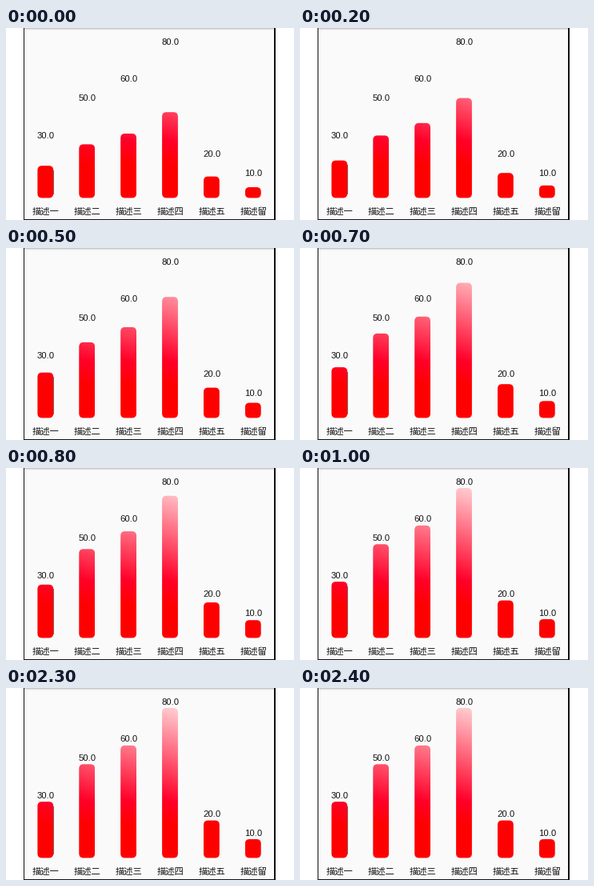
A matplotlib script that plays this animation: 360 px wide and 240 px high, repeating every 2500 ms.

```python
import numpy as np
import matplotlib.pyplot as plt
from matplotlib.animation import FuncAnimation
from matplotlib.patches import FancyBboxPatch, Rectangle

W, H, DPI = 360, 240, 100
FRAMES, INTERVAL = 25, 100
BASE, UNIT, BAR_W, RADIUS = 212.4, 2.343, 19.8, 5.5
FIRST_X, PITCH = 39.4, 51.9
START, STEP = 0.572, 0.047
TEXT_PX = 11.3

values = [30, 50, 60, 80, 20, 10]
labels = ["描述一", "描述二", "描述三", "描述四", "描述五", "描述留"]

fig = plt.figure(figsize=(W / 100, H / 100), dpi=DPI, facecolor="white")
ax = fig.add_axes([0, 0, 1, 1])
ax.axis("off")


def rect(x, y, w, h, color, z=0):
    ax.add_patch(Rectangle((x, y), w, h, fc=color, lw=0, zorder=z,
                           antialiased=False))


def text(x, y, s, font):
    ax.text(x, y, s, family=font, size=TEXT_PX * 72 / DPI, color="#111111",
            ha="center", va="baseline", zorder=4)


def gradient():
    """Pale pink to crimson to red, slightly tilted across the bar."""
    y, x = np.mgrid[0:H * 2, 0:40] / 2.0
    d = y - 0.3 * (x - 10)
    stops = [25, 141, 172]
    channels = [np.interp(d, stops, c)
                for c in ([255, 255, 255], [202, 0, 0], [206, 40, 0])]
    return np.stack(channels, axis=-1) / 255


def draw_frame():
    rect(22, 0, 315, 240, "#fafafa")
    for y, shade in enumerate(["#c4c4c4", "#e2e2e2", "#f2f2f2"]):
        rect(23, y, 313, 1, shade)
    rect(22, 0, 1, 240, "#111111", 1)
    rect(335, 0, 2, 240, "#111111", 1)
    rect(22, 239, 315, 1, "#111111", 1)


draw_frame()
shades = gradient()
bars = []
for i, (value, label) in enumerate(zip(values, labels)):
    x = FIRST_X + i * PITCH
    shape = FancyBboxPatch((x, BASE - 20), BAR_W, 20, fc="none", ec="none",
                           boxstyle=f"round,pad=0,rounding_size={RADIUS}")
    ax.add_patch(shape)
    fill = ax.imshow(shades, extent=(x, x + BAR_W + 0.2, H, 0), aspect="auto",
                     interpolation="bilinear", zorder=2)
    fill.set_clip_path(shape)
    bars.append((shape, fill, value))
    mid = x + BAR_W / 2 + 0.4
    text(mid, BASE - value * UNIT - 4.4, f"{value:.1f}", "Liberation Sans")
    text(mid, 233.2, label, "Noto Sans CJK JP")

edge, = ax.plot([], [], color="#4a1010", lw=0.6, alpha=0.7, zorder=3)

ax.set_xlim(0, W)
ax.set_ylim(H, 0)


def update(n):
    grow = min(1, START + STEP * n)
    for shape, fill, value in bars:
        h = value * UNIT * grow
        shape.set_y(BASE - h)
        shape.set_height(h)
        fill.set_clip_path(shape)
    top = BASE - values[0] * UNIT * grow
    edge.set_data([FIRST_X + BAR_W - 0.3] * 2, [top + RADIUS, BASE - RADIUS])
    return [fill for _, fill, _ in bars] + [edge]


anim = FuncAnimation(fig, update, frames=FRAMES, interval=INTERVAL,
                     repeat=True, repeat_delay=0, blit=False)
plt.show()
```
